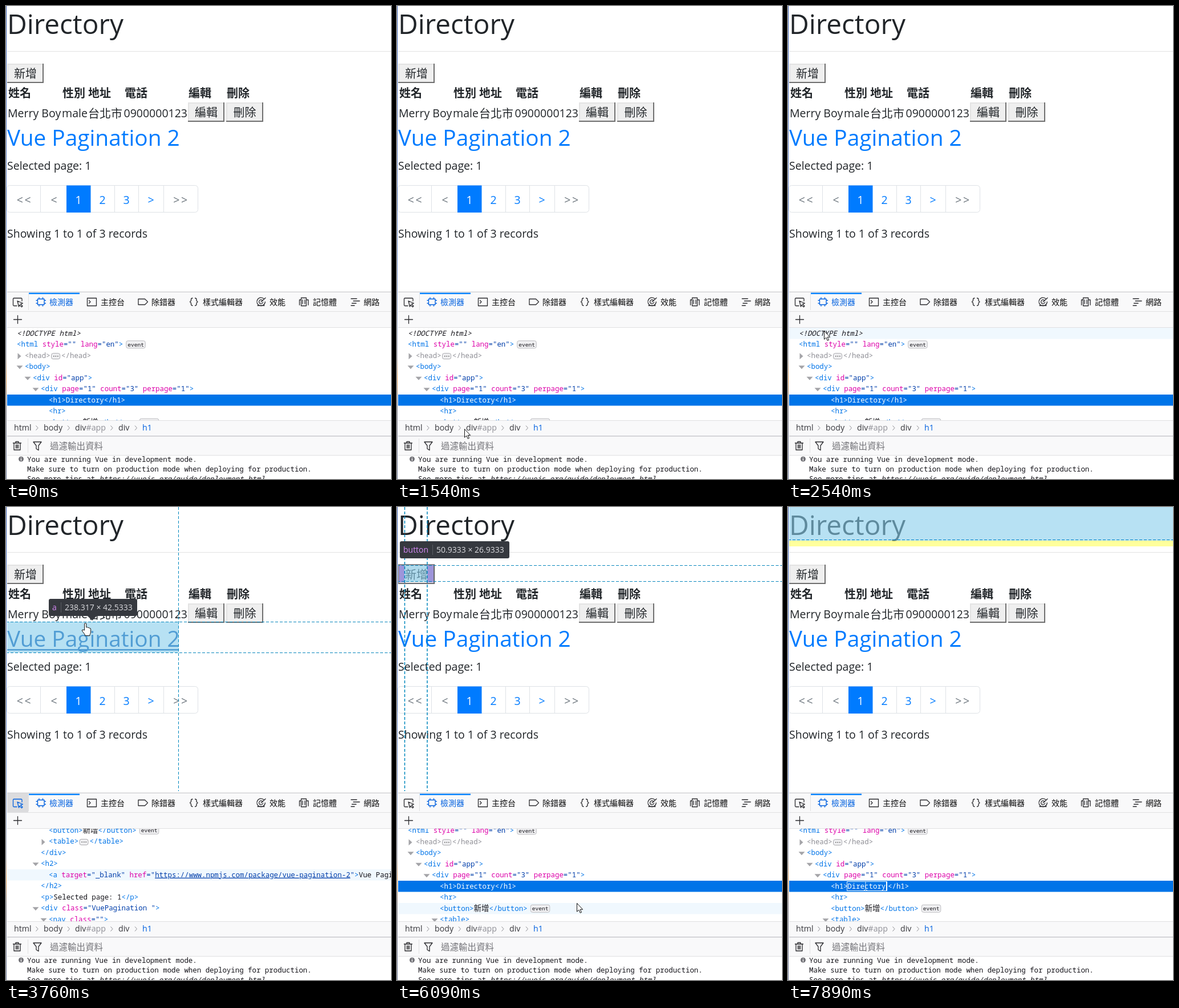
Recreate the animation shown at these times as an HTML page. Size 675 px wide and 829 px high, loop 8 s.

```html
<!DOCTYPE html>
<html lang="zh-Hant">
<head>
<meta charset="utf-8">
<style>
html, body { margin: 0; width: 100%; height: 100%; overflow: hidden; background: #fff; }
svg { display: block; }
text { white-space: pre; fill: #212529; font: 19.5px 'Open Sans', 'Noto Sans CJK TC', 'Noto Sans CJK', sans-serif; }
.zh { font: 20px 'Noto Sans CJK TC', 'Noto Sans CJK', sans-serif; }
.b { font-weight: 700; }
.h1 { font-size: 47.7px; }
.h2 { font-size: 38.8px; fill: #007bff; }
.hover .h2 { fill: #0056b3; }
#line { display: none; }
.hover #line { display: inline; }
.mid { text-anchor: middle; }
.mono { font: 12.42px 'Noto Sans Mono', 'Noto Sans CJK TC', 'Noto Sans CJK', monospace; fill: #15141a; }
.mono .c { font-size: 13.5px; }
.badge { font-size: 9.6px; }
.t { fill: #0074e8; }
.n { fill: #dd00a9; }
.v { fill: #003eaa; }
.u { text-decoration: underline; }
.i { font-style: italic; }
.sel tspan, .sel text { fill: #fff; }
.dim tspan { fill: #8f8f96; }
.tab { font: 14px 'Noto Sans CJK TC', 'Noto Sans CJK', sans-serif; fill: #0c0c0d; }
.crumb { font-size: 14.2px; fill: #38383d; }
.blue { fill: #0060df; }
.grey { fill: #8f8f96; }
.filter { font-size: 15.5px; fill: #737378; }
.tip { font-size: 14px; fill: #dcdce0; }
.tag { fill: #d589f5; }
.ic { fill: none; stroke: #2a2a2e; stroke-width: 1.3; stroke-linejoin: round; stroke-linecap: round; }
.on { stroke: #0060df; }
.dot { stroke: #fff; }
.rule { stroke: #dee2e6; }
.g { stroke: #0087bd; stroke-dasharray: 5 3; fill: none; }
.thick { stroke-width: 1.5; }
</style>
</head>
<body>
<svg id="stage" width="675" height="829" viewBox="0 0 675 829" xmlns="http://www.w3.org/2000/svg">
  <defs>
    <linearGradient id="edge" x2="0" y2="1">
      <stop offset="0" stop-color="#3c62b8"/><stop offset=".55" stop-color="#7d9bd6"/>
      <stop offset=".74" stop-color="#b9bccb"/><stop offset=".79" stop-color="#e8a45c"/>
      <stop offset=".84" stop-color="#8d8a94"/><stop offset="1" stop-color="#6d7a9c"/>
    </linearGradient>
    <clipPath id="tree"><path d="M2 564H675V726H2Z"/></clipPath>
    <clipPath id="view"><path d="M2 0H675V498H2Z"/></clipPath>
  </defs>
  <path fill="#fff" d="M0 0H675V829H0Z"/>
  <g id="page"></g>
  <g id="over" clip-path="url(#view)"></g>
  <g id="tools"></g>
  <g clip-path="url(#tree)"><g id="rows"></g></g>
  <g id="bars"></g>
  <path fill="url(#edge)" d="M0 0H1V829H0Z"/>
  <g id="mouse">
    <path id="arrow" fill="#fff" stroke="#111" d="M.5 .5V15.2L3.8 12.1L6.2 17.4L8.5 16.4L6.1 11.3H10.6Z"/>
    <path id="hand" fill="#fff" stroke="#111" stroke-linejoin="round" d="M-1.4 13V2Q-1.4 .5 .2 .5T1.8 2V8Q4.4 6.8 4.8 8.6Q7 7.6 7.4 9.5Q9.6 9 9.6 11.2V16Q9.6 18.5 8 20.5V22.5H-.5V20.8L-5.6 14Q-6 12 -4 12.2Z"/>
    <path id="beam" fill="none" stroke="#d8e6f6" d="M-3 -7.5H-1L0 -6.5L1 -7.5H3M0 -6.5V6.5M-3 7.5H-1L0 6.5L1 7.5H3"/>
  </g>
</svg>
<script>
const $ = id => document.getElementById(id);
const esc = s => s.replace(/&/g, '&amp;').replace(/</g, '&lt;');
const txt = (x, y, s, cls = '') => `<text x="${x}" y="${y}" class="${cls}">${esc(s)}</text>`;
const box = (x, y, w, h, fill, more = '') => `<rect x="${x}" y="${y}" width="${w}" height="${h}" fill="${fill}" ${more}/>`;
const path = (d, cls = 'ic') => `<path class="${cls}" d="${d}"/>`;
const show = (id, on) => { $(id).style.display = on ? '' : 'none'; };

// ---- web page
const button = (x, y, w, label) =>
  box(x, y, w, 34, '#6f6f6f') + box(x, y, w - 2, 32, '#e3e3e3') + box(x + 2, y + 2, w - 4, 30, '#efefef') +
  txt(x + w / 2, y + 25, label, 'zh mid');

$('page').innerHTML =
  txt(2, 49, 'Directory', 'h1') + box(2, 79, 673, 1, '#e2e2e2') + button(2, 101, 64, '新增') +
  [[4, '姓名'], [99, '性別'], [144, '地址'], [208, '電話'], [320, '編輯'], [387, '刪除']]
    .map(([x, s]) => txt(x, 159.5, s, 'zh b')).join('') +
  txt(3, 195, 'Merry Boy') + txt(98, 195, 'male') + txt(144, 195.5, '台北市', 'zh') + txt(206.5, 195, '0900000123') +
  button(319, 169, 64, '編輯') + button(386, 169, 65, '刪除') +
  txt(2, 245, 'Vue Pagination 2', 'h2') + `<path id="line" fill="#0056b3" d="M2 249H303V251.5H2Z"/>` +
  txt(2, 287, 'Selected page: 1') +
  box(1.5, 314.5, 335, 47, '#fff', 'rx="5" stroke="#dee2e6"') +
  path('M60.5 315V361M190.5 315V361M232.5 315V361M276.5 315V361', 'rule') + box(106, 314.5, 42.5, 47.5, '#007bff') +
  [[32.5, '<<', '#6c757d'], [84, '<', '#6c757d'], [127, '1', '#fff'], [169, '2', '#007bff'], [211, '3', '#007bff'],
   [254, '>', '#007bff'], [307, '>>', '#6c757d']]
    .map(([x, s, c]) => `<text x="${x}" y="347" class="mid" style="fill:${c};letter-spacing:${s.length > 1 ? 2.5 : 0}px">${esc(s)}</text>`).join('') +
  txt(2, 405.5, 'Showing 1 to 1 of 3 records');

// ---- developer tools frame
const tabs = [
  [166, '主控台', 'M142.5 512H158.5V525.5H142.5ZM145.5 516L148 518.5L145.5 521'],
  [255, '除錯器', 'M232 513.5H243.5L248.5 518.5L243.5 523.5H232Z'],
  [345, '樣式編輯器', 'M327 512Q324.5 512 324.5 514.5V516.5L322.5 518.5L324.5 520.5V522.5Q324.5 525 327 525M331.5 512Q334 512 334 514.5V516.5L336 518.5L334 520.5V522.5Q334 525 331.5 525'],
  [462, '效能', 'M452.5 513.5A7.2 7.2 0 1 0 454.3 518.5M450 516.5A3.5 3.5 0 1 0 450.5 519M447 518.7L455 511.5M441 525H453'],
  [538, '記憶體', 'M517.5 511.5H526.5V525.5H517.5ZM517.5 515H514.5V524M526.5 515H530V524M520 515V522M524 515V522'],
  [627, '網路', 'M605 513H615M609 517H620M606.5 521H614M605 525H611']
];
$('tools').innerHTML =
  box(2, 501, 673, 63, '#f9f9fa') + box(2, 500.5, 673, 1.5, '#d2d2d5') + box(2, 535, 673, 1, '#e0e0e2') + box(2, 563, 673, 1, '#e0e0e2') +
  `<g id="pickBg">${box(2, 502, 37, 33, '#dcdcde')}</g>` + box(39, 505, 1, 28, '#e0e0e2') + box(40, 502.5, 89, 2.5, '#0a84ff') +
  `<path id="pick" class="ic" d="M28 517V513.5Q28 512 26.5 512H14Q12.5 512 12.5 513.5V524Q12.5 525.5 14 525.5H19M20 517L29.5 521L25.5 522.3L29 526L27.5 527.5L23.8 524L22.5 527Z"/>` +
  path('M55.5 513.5H67V523.5H55.5ZM58 513V511M64.5 513V511M58 524V526M64.5 524V526M55 516H53M55 521H53M67.5 516H69.5M67.5 521H69.5', 'ic on') +
  txt(76, 523.5, '檢測器', 'tab blue') +
  tabs.map(([x, s, d]) => path(d) + txt(x, 523.5, s, 'tab')).join('') +
  path('M13.5 549.5H27.5M20.5 542.5V556.5');

$('bars').innerHTML =
  box(2, 726, 673, 61, '#f9f9fa') + box(2, 726, 673, 1, '#e0e0e2') + box(2, 753, 673, 1.5, '#c9c9cd') + box(2, 787, 673, 1, '#e0e0e2') +
  [[14, 'html'], [66, 'body'], [121, 'div'], [140.5, '#app', 'grey'], [197, 'div'], [239, 'h1', 'blue']]
    .map(([x, s, c = '']) => txt(x, 744, s, 'crumb ' + c)).join('') +
  [52.5, 108, 183.5, 226].map(x => `<path fill="none" stroke="#8a8a90" d="M${x} 735.5L${x + 3.5} 739.5L${x} 743.5"/>`).join('') +
  path('M12.5 766H26.5M17 766V763.5H22V766M14 766V778H25V766M17.5 769V775M19.5 769V775M21.5 769V775') +
  box(38, 758, 1, 25, '#e0e0e2') +
  path('M48 764H62L57 770.5V778.5L53 776V770.5Z') +
  txt(77, 776.5, '過濾輸出資料', 'zh filter') +
  '<circle cx="26.5" cy="794" r="4.5" fill="#737378"/>' + path('M26.5 793.5V796.5M26.5 791.3V791.4', 'ic dot') +
  txt(37, 799.3, 'You are running Vue in development mode.', 'mono') +
  txt(37, 816, 'Make sure to turn on production mode when deploying for production.', 'mono') +
  '<text x="37" y="832.5" class="mono">See more tips at <tspan class="i u">https://vuejs.org/guide/deployment.html</tspan></text>';

// ---- markup tree
const CH = 7.43, ROW = 19.5, TOP = 564;
const mid = i => TOP + (i + .5) * ROW;
const span = (cls, s) => `<tspan class="${cls}">${esc(s)}</tspan>`;
const attr = (_, name, val) => ' ' + span('n', name) + span('v', '="') + span(/^http/.test(val) ? 'v u' : 'v', val) + span('v', '"');
const paint = s => s.split(/(<[^>]*>)/).map(part => {
  const m = part.match(/^<(\/?\w+)(.*)>$/);
  if (m) return span('t', '<' + m[1]) + m[2].replace(/ ([\w-]+)="([^"]*)"/g, attr) + span('t', '>');
  return /[^\x00-\x7f]/.test(part) ? span('c', part) : esc(part);
}).join('');
const width = s => [...s].reduce((w, c) => w + (c > '~' ? 13.5 : CH), 0);
const line = (x, y, s, cls = '') => `<text x="${x}" y="${y}" class="mono ${cls}">${paint(s)}</text>`;

function row(i, [x, tri, s, badge, tail = '']) {
  const y = mid(i), end = x + width(s);
  let out = line(x, y + 4, s, i ? '' : 'i');
  if (tri === 'v') out += `<path fill="#a4a4a8" d="M${x - 14.5} ${y - 2}h11l-5.5 6z"/>`;
  if (tri === '>') out += `<path fill="#a4a4a8" d="M${x - 12.5} ${y - 4.5}v11l6 -5.5z"/>`;
  if (badge === 'event') out += box(end + 6, y - 6.5, 33.5, 13, '#f0f0f2', 'rx="3" stroke="#bcbcc0"') +
    txt(end + 8.5, y + 3.3, 'event', 'mono badge');
  if (badge === 'dots') out += box(end + 2, y - 4, 15, 10, '#f0f0f2', 'rx="3" stroke="#a8a8ad"') +
    `<path stroke="#555" stroke-width="1.5" stroke-dasharray="1.5 2" d="M${end + 5.5} ${y + 1}h9"/>` + line(end + 19.5, y + 4, tail);
  return `<g${i === 2 ? ' class="dim"' : ''}${i === 6 ? ' class="sel" id="plain"' : ''}>${out}</g>`;
}
const head = [
  [19, '', '<!DOCTYPE html>'],
  [19, '', '<html style="" lang="en">', 'event'],
  [33, '>', '<head>', 'dots', '</head>'],
  [33, 'v', '<body>'],
  [47, 'v', '<div id="app">'],
  [61, 'v', '<div page="1" count="3" perpage="1">'],
  [75, '', '<h1>Directory</h1>'],
  [75, '', '<hr>'],
  [75, '', '<button>新增</button>', 'event']
];
const closed = [
  [75, '>', '<table>', 'dots', '</table>'],
  [61, '', '</div>'],
  [61, 'v', '<h2>'],
  [75, '', '<a target="_blank" href="https://www.npmjs.com/package/vue-pagination-2">Vue Pagination 2</a>'],
  [61, '', '</h2>'],
  [61, '', '<p>Selected page: 1</p>'],
  [61, 'v', '<div class="VuePagination ">'],
  [75, 'v', '<nav class="">'],
  [89, '>', '<ul>', 'dots', '</ul>'],
  [75, '', '</nav>'],
  [61, '', '</div>']
];
const opened = [
  [75, 'v', '<table>'],
  [89, 'v', '<tr>'],
  ...['姓名', '性別', '地址', '電話', '編輯', '刪除'].map(s => [103, '', `<th>${s}</th>`]),
  [89, '', '</tr>']
];
const list = (rows, from) => rows.map((r, i) => row(from + i, r)).join('');
const selY = TOP + 6 * ROW;
$('rows').innerHTML =
  box(2, 0, 673, ROW, '#f0f8fe', 'id="tint"') + box(2, selY, 673, ROW, '#0074e8') + list(head, 0) +
  `<g id="closed">${list(closed, 9)}</g><g id="opened">${list(opened, 9)}</g>` +
  `<g id="edit" class="sel">${line(75, selY + 13.8, '<h1>') + line(104.3, selY + 13.8, 'Directory') + line(175, selY + 13.8, '</h1>')}
   ${box(103.5, selY + 1.5, 70, 16, 'none', 'stroke="#e6f0fb"') + box(172, selY + 1.5, 2, 16, '#fff')}</g>`;

// ---- elements that can be highlighted: tree row, then x, y, w, h
const nodes = {
  html: [1, 2, 0, 673, 424], body: [3, 2, 0, 673, 424], app: [4, 2, 0, 673, 424], div: [5, 2, 0, 673, 205],
  h1: [6, 2, 0, 673, 58], hr: [7, 2, 79, 673, 1], button: [8, 13, 102, 40, 29], table: [9, 2, 135, 451, 69],
  a: [12, 2, 201, 301, 54], p: [14, 2, 266, 673, 29], pager: [15, 2, 314, 673, 48]
};
const crumbs = { html: [14, 43], body: [66, 100], app: [121, 176], div: [197, 217], h1: [239, 255] };
const tips = {
  a: [75, 161, 155, 21, '238.317 × 42.5333'],
  button: [5, 60, 192, 57, '50.9333 × 26.9333']
};

function overlay(key) {
  if (!key) return '';
  const [, x, y, w, h] = nodes[key], r = x + w, b = y + h;
  const blue = 'rgba(135,206,235,.6)', violet = 'rgba(106,90,205,.6)', yellow = 'rgba(255,255,90,.6)';
  let out = box(x, y, w, key === 'h1' ? h + 1 : h, blue);
  if (key === 'h1') out += box(2, 59, 673, 10, yellow);
  if (key === 'hr') out += box(2, 59, 673, 20, yellow) + box(2, 80, 673, 20, yellow);
  if (key === 'button') out += box(3, 102, 10, 30, violet) + box(53, 102, 11, 30, violet) +
    box(2.5, 101, 63, 33, 'none', 'stroke="#6a6a70" stroke-width="1.5"') + path('M13.5 0V498M53 0V498', 'g thick');
  if (y > 0) out += path(`M0 ${y + .5}H675`, 'g');
  out += path(`M0 ${b - .5 + (key === 'a')}H675`, 'g');
  if (r < 675 && key !== 'button') out += path(`M${r - .5} 0V498`, 'g');
  if (tips[key]) {
    const [tx, ty, tw, sep, size] = tips[key];
    out += box(tx, ty, tw, 30, '#36393f', 'rx="3"') + box(tx + sep, ty + 6, 1, 18, '#5a5d63') +
      txt(tx + 6, ty + 20, key, 'tip tag') + txt(tx + sep + 7, ty + 20, size, 'tip');
    if (key === 'a') out += '<path fill="#36393f" d="M143 191H159L151 199Z"/>';
  }
  return out;
}

// ---- mouse path: start, end, steps, points
const moves = [
  [140, 680, 8, [[275, 845], [266, 795], [244, 746], [150, 744], [55, 737]]],
  [850, 1540, 10, [[55, 737], [70, 743], [92, 744], [118, 741]]],
  [1690, 2460, 11, [[118, 741], [106, 690], [80, 625], [63, 569]]],
  [2540, 3300, 11, [[63, 569], [63, 569], [84, 540], [45, 500], [19, 517]]],
  [3380, 3760, 6, [[19, 517], [60, 420], [112, 290], [139, 203]]],
  [3836, 4150, 5, [[139, 203], [150, 212], [146, 206]]],
  [4220, 4990, 11, [[146, 206], [128, 165], [95, 112], [62, 45], [45, 23]]],
  [5160, 5160, 1, [[45, 23], [54, 26]]],
  [5310, 5850, 8, [[54, 26], [150, 300], [280, 620], [318, 752]]],
  [6020, 6090, 2, [[318, 752], [314.5, 694]]],
  [6160, 6710, 8, [[314.5, 694], [235, 690], [165, 668], [135, 640]]],
  [6840, 6920, 2, [[135, 640], [135, 654]]],
  [7090, 7240, 3, [[135, 654], [134.5, 663]]],
  [7560, 7640, 2, [[122, 658], [136, 664]]]
];
function along(pts, u) {
  const n = pts.length - 1, i = Math.min(n - 1, Math.floor(u * n)), f = u * n - i;
  return pts[i].map((v, k) => v + (pts[i + 1][k] - v) * f);
}
function mouseAt(t) {
  let pos = moves[0][3][0];
  for (const [start, end, n, pts] of moves) {
    if (t < start) break;
    const gap = n > 1 ? (end - start) / (n - 1) : 1;
    pos = along(pts, Math.min(n, Math.floor((t - start + 8) / gap) + 1) / n);
  }
  return pos.map(Math.round);
}

const PICK = 3230, DONE = 5310;
const inside = (key, x, y) => {
  const [, bx, by, w, h] = nodes[key];
  return x >= bx && x < bx + w && y >= by && y < by + h;
};

function draw(now) {
  const t = now % 8000, [x, y] = mouseAt(t), picking = t >= PICK && t < DONE;
  let scroll = t >= DONE ? 26 : 0, key = '', at = -1;
  if (picking) {
    if (y < 498) {
      key = ['a', 'table', 'h1', 'button', 'p', 'pager', 'div', 'body'].find(k => inside(k, x, y)) || 'html';
      at = nodes[key][0];
      scroll = key === 'h1' ? 26 : Math.max(0, Math.round(mid(at) - 645));
    }
  } else if (y >= 564 && y < 726) {
    at = Math.floor((y - TOP + scroll) / ROW);
    key = Object.keys(nodes).find(k => nodes[k][0] === at) || '';
  } else if (y >= 727 && y < 752) {
    key = Object.keys(crumbs).find(k => x >= crumbs[k][0] && x <= crumbs[k][1]) || '';
  }
  if (draw.key !== key) {
    $('over').innerHTML = overlay(key);
    draw.key = key;
  }
  const link = picking && key === 'a', edit = t >= 7810;
  $('page').setAttribute('class', link ? 'hover' : '');
  $('tint').setAttribute('y', TOP + at * ROW);
  show('tint', at >= 0);
  $('rows').setAttribute('transform', `translate(0 ${-scroll})`);
  show('closed', t < 4190);
  show('opened', t >= 4190);
  show('plain', !edit);
  show('edit', edit);
  show('pickBg', picking);
  $('pick').setAttribute('class', picking ? 'ic on' : 'ic');
  $('mouse').setAttribute('transform', `translate(${x} ${y})`);
  show('arrow', !link && t < 7410);
  show('hand', link);
  show('beam', t >= 7560);
}
function tick() {
  draw(performance.now());
  requestAnimationFrame(tick);
}
tick();
</script>
</body>
</html>
```
